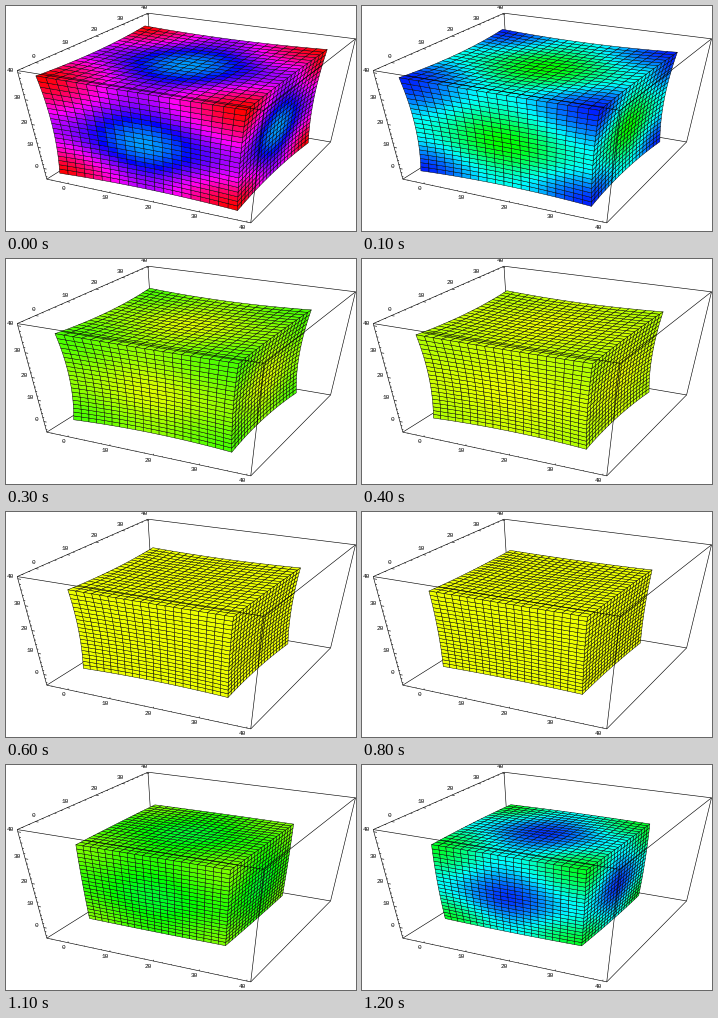
A matplotlib script for the animation above (1.3 s loop, 350 by 225 pixels).

```python
import numpy as np
import matplotlib.pyplot as plt
from matplotlib.animation import FuncAnimation
from matplotlib.collections import LineCollection, PolyCollection
from matplotlib.colors import hsv_to_rgb

W, H, DPI = 350, 225, 100
FRAMES, STEP = 13, 100
CELLS = 20
LO, HI = -5.3, 40.8                      # data range of every axis
PX = 72 / DPI                            # one pixel in points

# Screen positions of the visible box corners fix the perspective.
CORNERS = {
    (0, 0, 1): (11, 65), (1, 0, 1): (259, 104), (1, 1, 1): (349, 33),
    (0, 1, 1): (142, 7), (0, 0, 0): (41, 173), (1, 0, 0): (244, 217),
    (1, 1, 0): (325, 136),
}


def fit_camera():
    rows, rhs = [], []
    for p, (sx, sy) in CORNERS.items():
        q = np.array([*p, 1.0])
        r = np.array(p, float)
        rows.append(np.r_[q, np.zeros(4), -sx * r])
        rows.append(np.r_[np.zeros(4), q, -sy * r])
        rhs += [sx, sy]
    m = np.linalg.lstsq(np.array(rows), np.array(rhs, float), rcond=None)[0]
    return np.r_[m, 1.0].reshape(3, 4)


CAMERA = fit_camera()


def project(p):
    """Screen position and depth of points in the unit box."""
    p = np.asarray(p, float)
    h = p @ CAMERA[:, :3].T + CAMERA[:, 3]
    return h[..., :2] / h[..., 2:], h[..., 2]


# The solid: three visible faces of a cube in [-1, 1]^3
CENTRE = np.array([0.481, 0.468, 0.494])
HALF = np.array([0.334, 0.322, 0.344])


def face(axis, side):
    t = np.linspace(-1, 1, CELLS + 1)
    a, b = np.meshgrid(t, t, indexing="ij")
    g = np.insert(np.stack([a, b], -1), axis, side, axis=-1)
    quads = np.stack([g[:-1, :-1], g[1:, :-1], g[1:, 1:], g[:-1, 1:]], 2)
    return quads.reshape(-1, 4, 3)


QUADS = np.concatenate([face(0, 1), face(1, -1), face(2, 1)])
MID = QUADS.mean(axis=1)
# 0 at the middle of a face, 1 at a corner of the cube
SPREAD = ((np.sin(np.pi * MID / 2) ** 2).sum(axis=1) - 1) / 2


def shape(k):
    """Swollen at first, then settling; the faces cave in and recover."""
    grow = 1 + 0.31 * (1 - k / 11) ** 2
    pinch = 0.048 - 0.0058 * abs(k - 2)
    dip = 1 - QUADS ** 2
    others = dip.sum(axis=-1, keepdims=True) - dip
    return CENTRE + HALF * QUADS * (grow - pinch * others)


def colours(k):
    """Hue calms down to yellow and flares up again at the end."""
    mid = 0.178 + 0.385 * abs(1 - k / 5.9) ** 5
    tip = 0.178 + 0.822 * abs(1 - k / 7.2) ** 3.75
    hue = (mid + (tip - mid) * SPREAD) % 1.0
    full = np.ones_like(hue)
    return hsv_to_rgb(np.stack([hue, full, full], -1))


def box_edges():
    back, front = [], []
    near = (1, 0, 1)
    for axis in range(3):
        for i in (0, 1):
            for j in (0, 1):
                ends = [np.insert([i, j], axis, s) for s in (0, 1)]
                hit = any(tuple(e) == near for e in ends)
                (front if hit else back).append(project(ends)[0])
    return back, front


# axis, start corner, tick direction, label offset in pixels
AXES = [
    (0, (0, 0, 0), (0, 0, 1), (-5, 5)),
    (1, (0, 0, 1), (1, 0, 0), (-2, -6.5)),
    (2, (0, 0, 0), (1, 0, 0), (-7.5, -2.5)),
]


def ticks():
    marks, labels = [], []
    for axis, start, along, shift in AXES:
        for v in range(-4, 41, 2):
            p = np.array(start, float)
            p[axis] = (v - LO) / (HI - LO)
            major = v % 10 == 0
            size = 0.014 if major else 0.007
            marks.append(project([p, p + size * np.array(along)])[0])
            if major:
                labels.append((project(p)[0] + shift, str(v)))
    return marks, labels


fig = plt.figure(figsize=(W / DPI, H / DPI), dpi=DPI, facecolor="white")
ax = fig.add_axes([0, 0, 1, 1])
ax.set_xlim(0, W)
ax.set_ylim(H, 0)
ax.axis("off")

back, front = box_edges()
marks, labels = ticks()
for lines, z in ((back, 1), (marks, 1), (front, 3)):
    ax.add_collection(LineCollection(lines, colors="black",
                                     linewidths=0.6 * PX, zorder=z))
for (x, y), text in labels:
    ax.text(x, y, text, family="Liberation Mono", size=6.2 * PX,
            ha="center", va="center", zorder=4)

# Neighbouring cells share an edge, so each draws it thin.
mesh = PolyCollection([], edgecolors="black", linewidths=0.45 * PX, zorder=2)
ax.add_collection(mesh)


def draw(k):
    xy, depth = project(shape(k))
    order = np.argsort(-depth.mean(axis=1))      # far cells first
    mesh.set_verts(xy[order])
    mesh.set_facecolor(colours(k)[order])
    return [mesh]


anim = FuncAnimation(fig, draw, frames=FRAMES, interval=STEP,
                     init_func=lambda: draw(0), repeat=True, repeat_delay=0)
plt.show()
```
